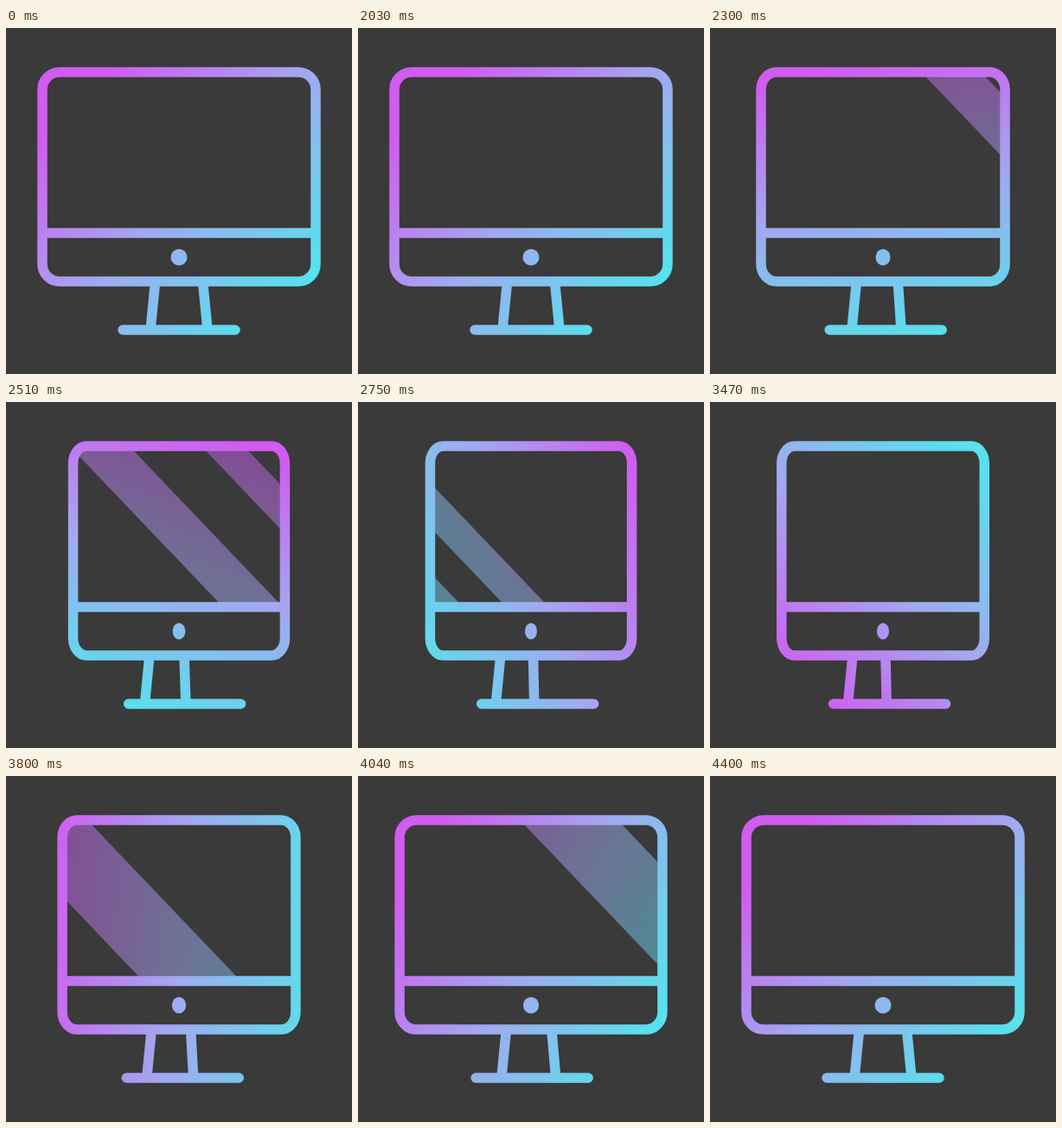
Recreate the animation shown at these times as an HTML page. Size 400x400 px, loop 4.43 s.

```html
<!DOCTYPE html>
<html lang="en">
<head>
<meta charset="utf-8">
<title>Turning monitor</title>
<style>
  html, body { margin: 0; width: 100%; height: 100%; overflow: hidden; background: #3a3a3a; }
  svg { display: block; width: 100vw; height: 100vh; }
</style>
</head>
<body>
<svg viewBox="0 0 400 400">
  <defs>
    <linearGradient id="tint" gradientUnits="userSpaceOnUse" x1="35" y1="200" x2="365" y2="200">
      <stop offset="0" stop-color="#d05cf0"/>
      <stop offset=".5" stop-color="#a2a9f0"/>
      <stop offset="1" stop-color="#58e0ec"/>
    </linearGradient>
    <clipPath id="glass"><rect id="pane" y="51" height="186"/></clipPath>
  </defs>
  <path id="shine" fill="url(#tint)" opacity=".5" clip-path="url(#glass)"/>
  <g fill="none" stroke="url(#tint)" stroke-width="11.5">
    <path id="legs"/>
    <path id="base" stroke-linecap="round"/>
    <rect id="frame" y="51" height="242" ry="20"/>
    <path id="divider"/>
  </g>
  <ellipse id="dot" cx="200" cy="265" ry="9.5" fill="url(#tint)"/>
</svg>
<script>
const LOOP = 4430, TURN = 2030, RETURN = 3380;
const el = id => document.getElementById(id);
const set = (id, attrs) => {
  for (const name in attrs) el(id).setAttribute(name, attrs[name]);
};
const mix = (a, b, k) => a + (b - a) * k;
const progress = (t, start, duration) => Math.min(1, Math.max(0, (t - start) / duration));
const smooth = u => u * u * (3 - 2 * u);

// Cubic Bezier easing, solved by bisection
function bezier(x1, y1, x2, y2) {
  const curve = (s, a, b) => 3 * (1 - s) ** 2 * s * a + 3 * (1 - s) * s * s * b + s ** 3;
  return u => {
    if (u <= 0 || u >= 1) return u;
    let low = 0, high = 1;
    for (let i = 0; i < 24; i++) {
      const mid = (low + high) / 2;
      if (curve(mid, x1, x2) < u) low = mid; else high = mid;
    }
    return curve(low, y1, y2);
  };
}
const easeTurn = bezier(.4, 0, .3, 1);
const easeReturn = bezier(.42, 0, .58, 1);
const easeSpin = bezier(.4, .25, .6, 1);

// Slanted light band; x is its left edge at the top of the glass
const band = (x, width) => `M${x} 56h${width}l168 176h${-width}z`;

function shinePath(t) {
  if (t < RETURN) {
    const wide = mix(355, -232, smooth(progress(t, TURN, 1000)));
    const narrow = mix(426, -232, smooth(progress(t, TURN + 120, 1000)));
    return band(wide, 69) + band(narrow, 49);
  }
  return band(mix(-232, 355, smooth(progress(t, RETURN + 8, 1000))), 113);
}

function draw(t) {
  const turn = easeTurn(progress(t, TURN, 780)) - easeReturn(progress(t, RETURN, 900));
  const half = mix(158, 116.4, turn), left = 200 - half, scale = half / 158;
  const spin = 45 + 360 * easeSpin(progress(t, TURN, 2370));

  set('tint', { gradientTransform: `rotate(${spin} 200 200)` });
  set('frame', { x: left, width: 2 * half, rx: 20 * scale });
  set('pane', { x: left, width: 2 * half });
  set('divider', { d: `M${left} 237h${2 * half}` });
  set('dot', { rx: 9.5 * scale });
  set('legs', {
    d: `M${mix(172.6, 164.8, turn)} 293L${mix(167, 159.3, turn)} 349` +
       `M${mix(227.5, 202.4, turn)} 293L${mix(233, 203.6, turn)} 349`
  });
  set('base', { d: `M${mix(135, 142.7, turn)} 349h130` });
  set('shine', { d: shinePath(t) });
}

function tick() {
  draw(performance.now() % LOOP);
  requestAnimationFrame(tick);
}
tick();
</script>
</body>
</html>
```
